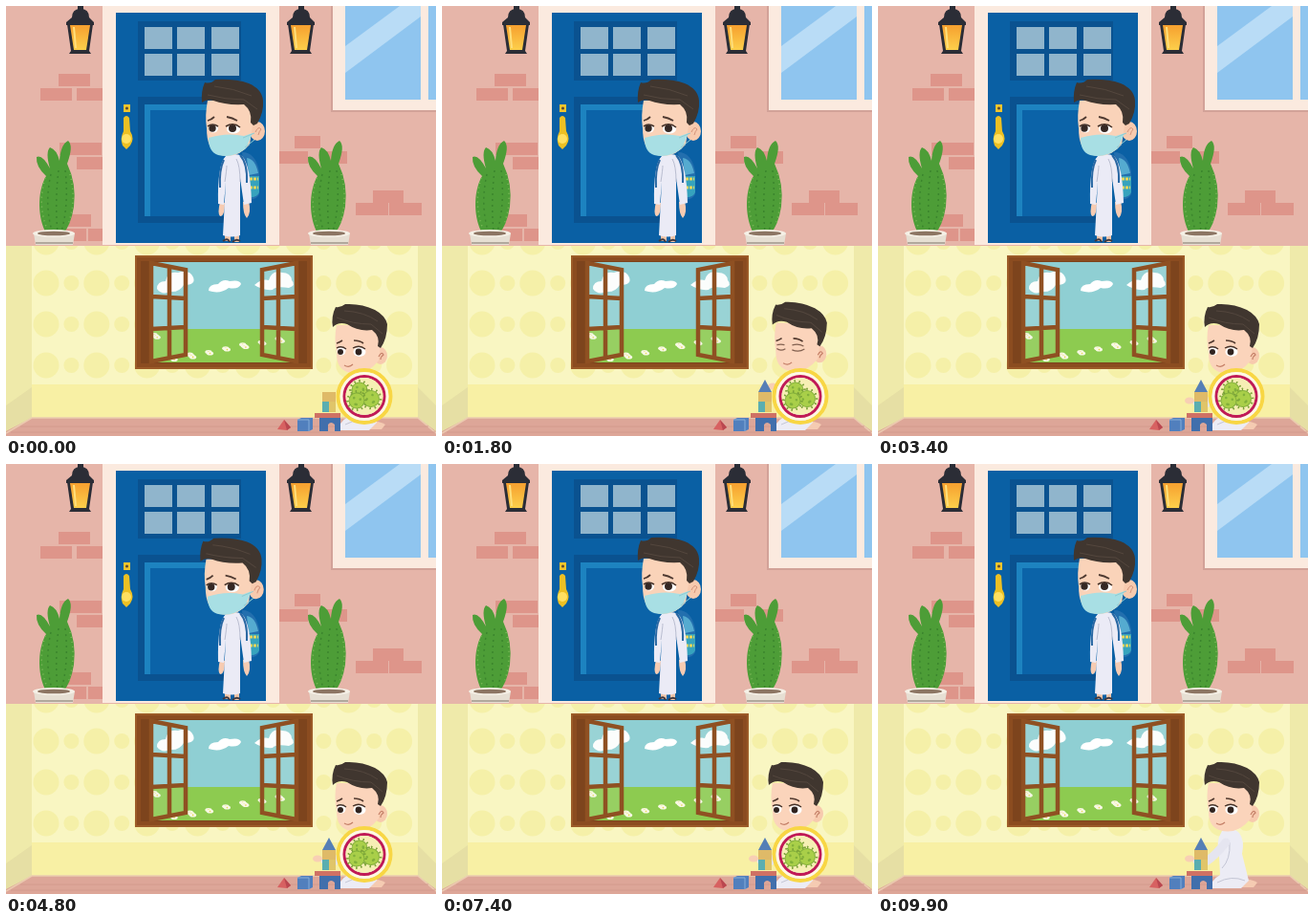
Recreate the animation shown at these times as an HTML page. Size 450 by 450 pixels, loop 10000 ms.

```html
<!DOCTYPE html>
<html lang="en">
<head>
<meta charset="utf-8">
<title>Outside and inside</title>
<style>
html, body { margin: 0; width: 100%; height: 100%; overflow: hidden; background: #e5b5a9 }
svg { display: block; width: 100vw; height: 100vh }
</style>
</head>
<body>
<svg viewBox="0 0 450 450">
<defs>
  <linearGradient id="lamp" x2="0" y2="1"><stop stop-color="#f6a02f"/><stop offset="1" stop-color="#fdcf4b"/></linearGradient>
  <g id="lantern">
    <path d="M75 0h6v6h-6zM69 12q0-9 9-9t9 9l5 5v3H63v-3z" fill="#2b2d36"/>
    <path d="M64 19h27l-4 28 2 3H66l2-3z" fill="#2b2d36"/>
    <path d="M67 20h21l-4 26H71z" fill="url(#lamp)"/>
    <path d="M71 22l2 22" stroke="#ffe07c" stroke-width="2"/>
  </g>
  <g id="cactus">
    <path d="M41 236C32 217 34 191 42 178Q31 168 32 158Q38 155 46 170Q41 153 46 148Q53 150 56 162Q57 145 65 141Q71 146 64 165Q74 186 71 210Q68 229 60 238Z" fill="#4d9d37"/>
    <path d="M47 176Q40 207 48 235M55 172Q51 205 54 237M62 172Q66 207 58 236" fill="none" stroke="#3b852d" stroke-width="1.5" stroke-dasharray="2 4"/>
    <path d="M41 180Q33 205 42 231M67 176Q74 203 65 229" fill="none" stroke="#80bd5c" stroke-width="1.5" stroke-dasharray="1 4"/>
  </g>
  <g id="pot">
    <path d="M29 238h43l-2 12H31z" fill="#e6dfd3"/>
    <ellipse cx="50" cy="238" rx="22" ry="4" fill="#f5f0e6"/>
    <ellipse cx="50" cy="238" rx="17" ry="2.3" fill="#8c7563"/>
    <path d="M31 248h39" stroke="#b1a89c" stroke-width="2"/>
  </g>
  <g id="shutter">
    <path d="M151 267L190 275V366L151 374Z" fill="#d8eee0" fill-opacity=".12"/>
    <path d="M152 269L188 276V365L152 372ZM171 272V369M152 304L188 306M152 338L188 336" fill="none" stroke="#8f5022" stroke-width="4.5"/>
  </g>
  <clipPath id="wall"><path d="M27 251H431V396H27z"/></clipPath>
</defs>

<path d="M0 0h450v251H0z" fill="#e6b5a9"/>
<g id="bricks" fill="#de958a"/>
<path d="M101 0H286V250H101z" fill="#fbeadf"/>
<path d="M115 7H272V248H115z" fill="#0a60a4"/>
<path d="M138 16H246V78H138z" fill="#0a5290"/>
<g id="panes" fill="#90b5cc"/>
<path d="M138 95H240V227H138z" fill="#0a5290"/>
<path d="M145 103H234V220H145z" fill="#0b63a8"/>
<path d="M148 220V106H234" fill="none" stroke="#1d83c0" stroke-width="6"/>
<path d="M123 103h7v8h-7z" fill="#f4c52d"/><circle cx="126.5" cy="107" r="1.5" fill="#5b4930"/>
<path d="M123 117q3-4 6 0l1 14q5 8 0 15l-4 4-4-4q-3-7 1-15z" fill="#edc023"/>
<circle cx="126" cy="139" r="5" fill="#ffe061"/>
<use href="#lantern"/><use href="#lantern" x="231"/>
<path d="M341 0H450V111H341z" fill="#fbeadf"/>
<path d="M341 0V110H450" fill="none" stroke="#d2a298" stroke-width="2"/>
<path d="M355 0h79v98h-79zM442 0h8v98h-8z" fill="#8fc5ef"/>
<path d="M355 42L412 0H434V11L355 70z" fill="#b9dcf6"/>
<use href="#cactus"/><use href="#cactus" x="284"/>
<use href="#pot"/><use href="#pot" x="288"/>

<g>
  <path d="M247 153q14 0 18 20v24q-3 7-13 5z" fill="#236fae"/>
  <path d="M252 159q9 1 12 16l-10 2z" fill="#55abd0"/>
  <path d="M254 178h11v17q-2 6-11 5z" fill="#36a3bd"/>
  <path d="M255 181h9M255 190h9" stroke="#e9d65a" stroke-width="3" stroke-dasharray="3 1"/>
  <path d="M229 240v6h6v-6M239 240v7h5v-7" fill="#f0c5a9"/>
  <path d="M227 246q5-4 7 1M237 247q4-4 8-1" fill="none" stroke="#3f3a42" stroke-width="2"/>
  <path d="M224 205q-3 12 0 15 5 0 5-14M248 205q0 13 4 17 5-5 2-18" fill="#f6cbb2"/>
  <path d="M230 157q9-4 17 0 9 9 10 49l-8 2-4-28v60q-9 3-18 0l3-56-2 24-6-1q-1-41 8-50z" fill="#ebebf6"/>
  <path d="M229 184q2-13 2-17M245 184q0-17-4-24" fill="none" stroke="#b9bdd0"/>
  <path d="M228 161q-5 10-4 29M245 156q8 9 7 29" fill="none" stroke="#2a68a3" stroke-width="2"/>
</g>
<g id="head1">
  <ellipse cx="263" cy="131" rx="8" ry="10" fill="#f7caae"/>
  <path d="M261 132q3-7 6-3-2 2-3 6" fill="none" stroke="#d4947b"/>
  <path d="M211 99Q208 114 210 128Q210 150 222 155Q240 162 255 145L260 113L250 98z" fill="#fad3b9"/>
  <path d="M205 101Q204 89 208 80Q214 82 219 77Q240 76 254 81Q268 87 269 99Q270 111 263 123L259 125L256 122Q258 110 249 103Q230 104 217 99Q210 97 205 101Z" fill="#40362f"/>
  <path d="M211 93Q230 98 249 98L263 108M218 84Q238 86 257 94" fill="none" stroke="#54473e"/>
  <path d="M212 138Q231 132 249 136L258 133L251 149Q237 160 222 156Q212 153 212 138Z" fill="#a8dfe4"/>
  <path d="M248 138l12-5M250 148l10-8" fill="none" stroke="#8fcbd2"/>
  <path d="M211 120q4-1 7-4M231 116q6 1 11 4" fill="none" stroke="#4f3a31" stroke-width="1.8"/>
  <g class="open">
    <ellipse cx="217" cy="128" rx="5" ry="4.5" fill="#fff"/><ellipse cx="238" cy="129" rx="7" ry="4.5" fill="#fff"/>
    <circle cx="216" cy="128" r="3.7" fill="#352824"/><circle cx="237" cy="128" r="4" fill="#352824"/>
    <path d="M211 126q5-4 11 0M230 126q8-5 15 1" fill="none" stroke="#443128" stroke-width="1.6"/>
  </g>
  <path class="shut" d="M212 130q5 3 10 0M231 131q7 4 14-1M212 126q5-2 9 0M231 126q7-3 13 0" fill="none" stroke="#88604f" stroke-width="1.2"/>
</g>

<path d="M0 251H450V450H0z" fill="#efeaaa"/>
<path d="M27 251H431V432H27z" fill="#f9f6c2"/>
<g id="dots" fill="#f5f0a8" clip-path="url(#wall)"/>
<path d="M27 396H431V432H27z" fill="#f8f0a4"/>
<path d="M0 418L27 399V432L0 448zM450 418L431 399V432L450 448z" fill="#e6dfa4"/>
<path d="M27 431H431L450 445V450H0V445z" fill="#dda698"/>
<path d="M0 447L27 431H431L450 447" fill="none" stroke="#ecccb0" stroke-width="1.5"/>
<path d="M15 440H442M5 446H449" stroke="#d39a8d"/>
<path d="M135 261H321V380H135z" fill="#8b4c20"/>
<path d="M141 267H315V374H141z" fill="#7d441d"/>
<path d="M151 268H305V338H151z" fill="#8fcfd3"/>
<path d="M151 338H305V373H151z" fill="#8dcb50"/>
<g fill="#fff">
  <path d="M158 296q0-8 9-8 2-11 13-9 12-4 16 5 3 8-10 8-5 8-14 7-9 4-14-3z"/>
  <path d="M212 298q0-7 10-7 5-6 12-3 11-2 12 3-3 6-13 4-9 7-21 3z"/>
  <path d="M260 292q8-7 15-5 3-11 14-8 9 0 10 8 5 5-3 8-14-2-17 2-10 1-19-5z"/>
</g>
<g id="flowers" fill="#f8f8e4"/>
<use href="#shutter"/><use href="#shutter" transform="translate(456) scale(-1 1)"/>
<path d="M136 262H320V379H136z" fill="none" stroke="#9c5b28" stroke-width="2"/>

<path d="M284 443l7-10 7 8-4 3z" fill="#d76161"/><path d="M291 433l7 8-4 3z" fill="#b9474f"/>
<path d="M305 433l4-2h12v12l-4 2h-12z" fill="#517fbd"/><path d="M305 433h12v12" fill="none" stroke="#86aed8"/>

<path d="M379 435q10-2 18 3l-4 5h-15z" fill="#f5cbb2"/>
<path d="M360 384q11-5 18 2 6 8 3 22l7 28-8 8h-30q-3-8 8-14l-1-20q-4-15 3-26z" fill="#ececf5"/>
<path d="M355 438q15-8 29-2M368 396q1 18-8 27" fill="none" stroke="#c4c6d5"/>
<path id="sleeve" fill="none" stroke="#e5e5f0" stroke-width="9" stroke-linecap="round"/>
<ellipse id="hand" rx="5" ry="3.5" fill="#f8cfb4"/>
<path d="M323 426h27v5h-27z" fill="#cf7164"/>
<path d="M328 431h22v14h-6v-7q-4-4-7 0v7h-9z" fill="#416fac"/>
<path d="M331 414h14v11h-14z" fill="#5aaeb0"/><path d="M338 414h7v11h-7z" fill="#e0c569"/>
<path d="M331 404h14v10h-14z" fill="#dfba68"/>
<path id="roof" d="M331 404l7-13 7 13z" fill="#557fb6"/>

<g id="head2">
  <ellipse cx="392" cy="366" rx="7" ry="9" fill="#f7caae"/>
  <path d="M346 334Q343 347 346 364Q346 379 357 383Q376 389 390 371L393 347L382 334z" fill="#fbd4bb"/>
  <path d="M342 336Q340 325 345 315Q350 316 355 312Q372 311 386 318Q397 324 399 333Q399 348 392 358L389 356Q392 346 383 339Q369 341 357 333Q348 330 342 336Z" fill="#40362f"/>
  <path d="M346 326Q363 333 382 333L394 343M354 319Q375 320 389 330" fill="none" stroke="#54473e"/>
  <path d="M346 353q3-1 6-3M364 350q6 0 10 3" fill="none" stroke="#51392e" stroke-width="1.6"/>
  <g class="open">
    <ellipse cx="351" cy="361" rx="4.5" ry="4.5" fill="#fff"/><ellipse cx="370" cy="362" rx="6.5" ry="5" fill="#fff"/>
    <circle cx="350" cy="362" r="3" fill="#30231f"/><circle cx="369" cy="362" r="3.4" fill="#30231f"/>
    <path d="M346 358q5-3 10 1M363 358q7-4 13 1" fill="none" stroke="#443128" stroke-width="1.3"/>
  </g>
  <path class="shut" d="M347 361q4 3 9 0M363 362q7 3 13-1M347 357q5-1 8 0M363 357q7-2 12 1" fill="none" stroke="#81604f" stroke-width="1.2"/>
  <path d="M354 376q5 3 9-1M390 367q3-6 5-2-3 2-3 5" fill="none" stroke="#c47f67" stroke-width="1.2"/>
</g>
<g id="ring" fill="none">
  <circle cx="375" cy="408.5" r="27.5" stroke="#f8d644" stroke-width="4"/>
  <circle cx="375" cy="408.5" r="23.5" stroke="#fff8e4" stroke-width="4"/>
  <circle cx="375" cy="408.5" r="21" stroke="#c01a56" stroke-width="3"/>
</g>
<g id="germs"><circle cx="375" cy="408.5" r="19.5" fill="#f6efb4"/></g>
</svg>
<script>
const $ = id => document.getElementById(id);
const set = (el, attrs) => {
  for (const key in attrs) el.setAttribute(key, attrs[key]);
  return el;
};
const add = (parent, tag, attrs) =>
  parent.appendChild(set(document.createElementNS('http://www.w3.org/2000/svg', tag), attrs));
const rect = (id, x, y, width, height) => add($(id), 'rect', {x, y, width, height});
const dot = (parent, cx, cy, r, fill) => add(parent, 'circle', fill ? {cx, cy, r, fill} : {cx, cy, r});

[[55,71,33],[36,86,33],[74,86,27],[56,143,44],[74,158,27],[65,218,24],[48,233,36],[86,233,15],
 [302,136,27],[286,152,30],[333,152,24],[384,193,32],[366,206,34],[401,206,34]]
  .forEach(([x, y, w]) => rect('bricks', x, y, w, 13));
for (const x of [145, 179, 215]) for (const y of [22, 50]) rect('panes', x, y, 29, 23);
for (let row = 0; row < 4; row++)
  for (let i = 0; i < 15; i++)
    dot($('dots'), 42 + i * 26.4, 247 + row * 43, i % 2 ? 8 : 13.5);
for (let i = 0; i < 20; i++) {
  const x = 155 + (i * 92.7) % 148, y = 344 + (i * 10.3) % 27;
  add($('flowers'), 'ellipse', {cx: x, cy: y, rx: 3.6, ry: 2});
  dot($('flowers'), x, y, .8, '#e9d44b');
}

const germs = [[370, 402, 8], [382, 411, 8.5], [367, 413, 8]].map(([x, y, r], n) => {
  const g = add($('germs'), 'g', {});
  for (let i = 0; i < 12; i++) {
    const a = i * Math.PI / 6, c = Math.cos(a), s = Math.sin(a);
    add(g, 'path', {d: `M${x + c * r} ${y + s * r}l${c * 2.5} ${s * 2.5}`, stroke: '#6f9636'});
    dot(g, x + c * (r + 2), y + s * (r + 2), .9, '#7fa53a');
  }
  add(g, 'circle', {cx: x, cy: y, r, fill: '#a9cf49', stroke: '#84b03c'});
  for (let i = 0; i < 4; i++)
    dot(g, x + Math.cos(i * 2 + n) * r * .5, y + Math.sin(i * 2 + n) * r * .5, 1.3, '#82b03b');
  return {g, x, y};
});

const clamp = v => Math.max(0, Math.min(1, v));
const ramp = (t, from, to) => clamp((t - from) / (to - from));
const ease = (t, from, to) => { const v = ramp(t, from, to); return v * v * (3 - 2 * v); };
const mix = (a, b, v) => a + (b - a) * v;

function pose(id, amount, closed, dx, dy, angle, x, y) {
  const head = $(id);
  set(head, {transform: `translate(${dx * amount} ${dy * amount}) rotate(${angle * amount} ${x} ${y})`});
  head.querySelector('.open').style.display = closed ? 'none' : '';
  head.querySelector('.shut').style.display = closed ? '' : 'none';
}

function draw(now) {
  const t = Math.floor(now / 100) % 100 / 10;

  // The boy at the door nods and blinks every 3.9 s.
  const beat = (t + .75) % 3.9 - 1.95;
  pose('head1', ease(beat, -.4, -.1) * (1 - ease(beat, .1, .4)), Math.abs(beat) < .17, -4, 2, -2, 240, 154);

  // The other boy looks up while he puts the roof on, then rests his hand on the tower.
  const up = ease(t, 1.2, 1.7) * (1 - ease(t, 2, 2.5));
  pose('head2', up, Math.abs((t + .15) % 3.9 - 1.95) < .17, 3, -2, 1, 373, 383);
  const lift = ease(t, .2, 1.3), rest = ease(t, 2, 2.7);
  const x = mix(mix(372, 346, lift), 326, rest), y = mix(mix(418, 398, lift), 413, rest);
  set($('sleeve'), {d: `M364 396Q${x + 14} ${y + 12} ${x + 8} ${y + 2}`});
  set($('hand'), {cx: x, cy: y});
  set($('roof'), {transform: `translate(${26 * (1 - lift)} ${20 * (1 - lift)})`});

  $('ring').style.opacity = 1 - ramp(t, 8.8, 9.3);
  $('germs').style.opacity = 1 - ramp(t, 8.7, 9);
  germs.forEach(({g, x, y}, i) =>
    set(g, {transform: `rotate(${Math.sin(t * 2.4 + i * 2) * 5} ${x} ${y})`}));
  requestAnimationFrame(draw);
}
requestAnimationFrame(draw);
</script>
</body>
</html>
```
